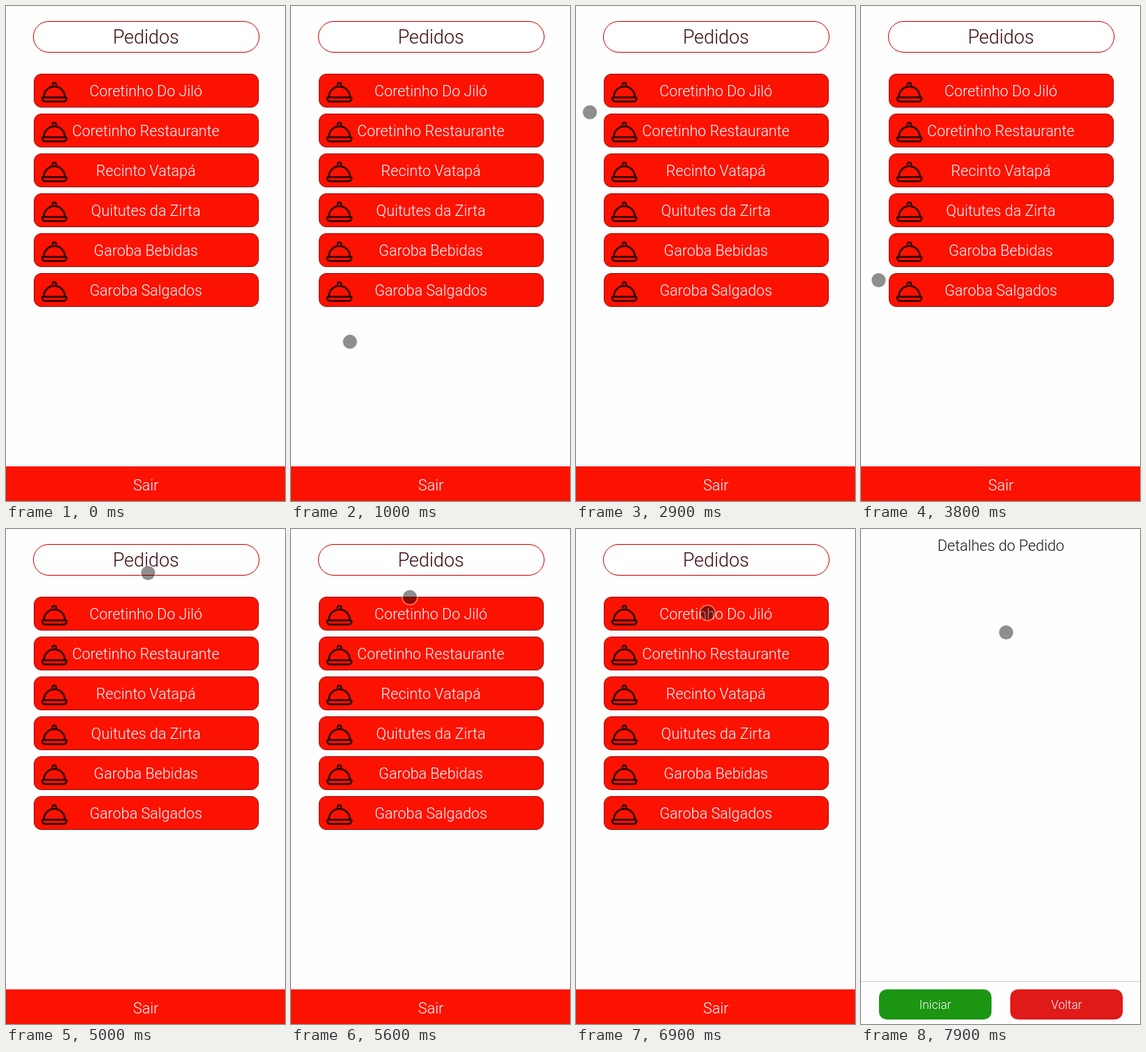
An HTML page with a canvas that plays this animation: 372 by 658 pixels, repeating every 8 s.

```html
<!DOCTYPE html>
<html lang="pt-BR">
<head>
<meta charset="utf-8">
<title>Pedidos</title>
<style>
  html, body { margin: 0; width: 100%; height: 100%; overflow: hidden; background: #fefefe; }
  canvas { display: block; width: 372px; height: 658px; }
</style>
</head>
<body>
<canvas id="stage"></canvas>
<script>
const W = 372, H = 658, MID = 186.5;
const LOOP = 8000, STEP = 100, ENTER = 400, OPEN_DETAILS = 7900;
const RED = '#fc1200', INK = '#2b0303';
const shops = [
  'Coretinho Do Jiló', 'Coretinho Restaurante', 'Recinto Vatapá',
  'Quitutes da Zirta', 'Garoba Bebidas', 'Garoba Salgados'
];

// The pointer rests between moves
const entry = { x: -10, y: 270 };
const moves = [
  { end: 1200, time: 800, x: 95, y: 479 },
  { end: 1600, time: 400, x: 67, y: 476 },
  { end: 2000, time: 100, x: 65.5, y: 454.5 },
  { end: 2600, time: 600, x: 18, y: 120 },
  { end: 3800, time: 1100, x: 23.5, y: 364.5 },
  { end: 4200, time: 400, x: 24, y: 120 },
  { end: 4500, time: 300, x: 110, y: 40 },
  { end: 5000, time: 500, x: 189.5, y: 58.5 },
  { end: 5400, time: 300, x: 153, y: 73 },
  { end: 5600, time: 200, x: 158.5, y: 90.5 },
  { end: 6000, time: 400, x: 175.5, y: 111.5 },
  { end: OPEN_DETAILS, time: 100, x: 193.5, y: 137.5 }
];

const canvas = document.getElementById('stage');
const ctx = canvas.getContext('2d');
const ratio = window.devicePixelRatio || 1;
canvas.width = W * ratio;
canvas.height = H * ratio;
ctx.scale(ratio, ratio);

function box(x, y, w, h, r, fill, stroke) {
  ctx.beginPath();
  ctx.roundRect(x, y, w, h, r);
  ctx.fillStyle = fill;
  ctx.fill();
  if (stroke) {
    ctx.strokeStyle = stroke;
    ctx.lineWidth = 1;
    ctx.stroke();
  }
}

function label(text, x, y, size, color) {
  ctx.font = `350 ${size}px Roboto, sans-serif`;
  ctx.textAlign = 'center';
  ctx.fillStyle = color;
  ctx.fillText(text, x, y);
}

function cloche(x, y) {
  ctx.save();
  ctx.translate(x, y);
  ctx.strokeStyle = INK;
  ctx.lineWidth = 2.5;
  ctx.lineJoin = 'round';
  ctx.beginPath();
  ctx.ellipse(17.5, 20, 14, 14, 0, Math.PI, 0);
  ctx.moveTo(20, 4.2);
  ctx.arc(17.5, 3.6, 2.5, 0.25, Math.PI - 0.25, true);
  ctx.roundRect(1.3, 20.5, 32.4, 5.5, [1, 1, 4, 4]);
  ctx.stroke();
  ctx.restore();
}

function drawList() {
  box(36.5, 20.5, 301, 41, 20.5, '#fff', '#cc0c0c');
  label('Pedidos', MID, 50, 25, '#3a0808');
  shops.forEach((name, i) => {
    const y = 90 + i * 53;
    box(37.5, y + 0.5, 299, 44, 9.5, RED, '#a01208');
    cloche(47, y + 11);
    label(name, MID, y + 30, 20, '#fff');
  });
  ctx.fillStyle = RED;
  ctx.fillRect(0, 612, W, 46);
  label('Sair', MID, 644, 20, '#fff');
}

function drawDetails() {
  label('Detalhes do Pedido', MID, 29, 20, '#141414');
  ctx.fillStyle = '#cfcfcf';
  ctx.fillRect(0, 601, W, 1);
  box(24, 612, 150, 40, 10, '#1c9612');
  box(199, 612, 150, 40, 10, '#e01919');
  label('Iniciar', 99, 638, 16, '#fff');
  label('Voltar', 274, 638, 16, '#fff');
}

const smooth = k => k * k * (3 - 2 * k);

function pointerAt(t) {
  let { x, y } = entry;
  for (const move of moves) {
    const progress = (t - move.end + move.time) / move.time;
    const k = smooth(Math.min(1, Math.max(0, progress)));
    x += (move.x - x) * k;
    y += (move.y - y) * k;
  }
  return { x, y };
}

function disc(x, y, r) {
  ctx.beginPath();
  ctx.arc(x, y, r, 0, Math.PI * 2);
}

function drawPointer(t) {
  const { x, y } = pointerAt(t);
  disc(x, y, 9.5);
  ctx.fillStyle = 'rgba(0, 0, 0, 0.44)';
  ctx.fill();
  disc(x, y, 10.2);
  ctx.strokeStyle = 'rgba(255, 255, 255, 0.4)';
  ctx.lineWidth = 1.6;
  ctx.stroke();
}

const start = performance.now();

function frame() {
  const t = Math.floor(((performance.now() - start) % LOOP) / STEP) * STEP;
  ctx.fillStyle = '#fefefe';
  ctx.fillRect(0, 0, W, H);
  if (t < OPEN_DETAILS) drawList();
  else drawDetails();
  if (t >= ENTER) drawPointer(t);
  requestAnimationFrame(frame);
}
frame();
</script>
</body>
</html>
```
